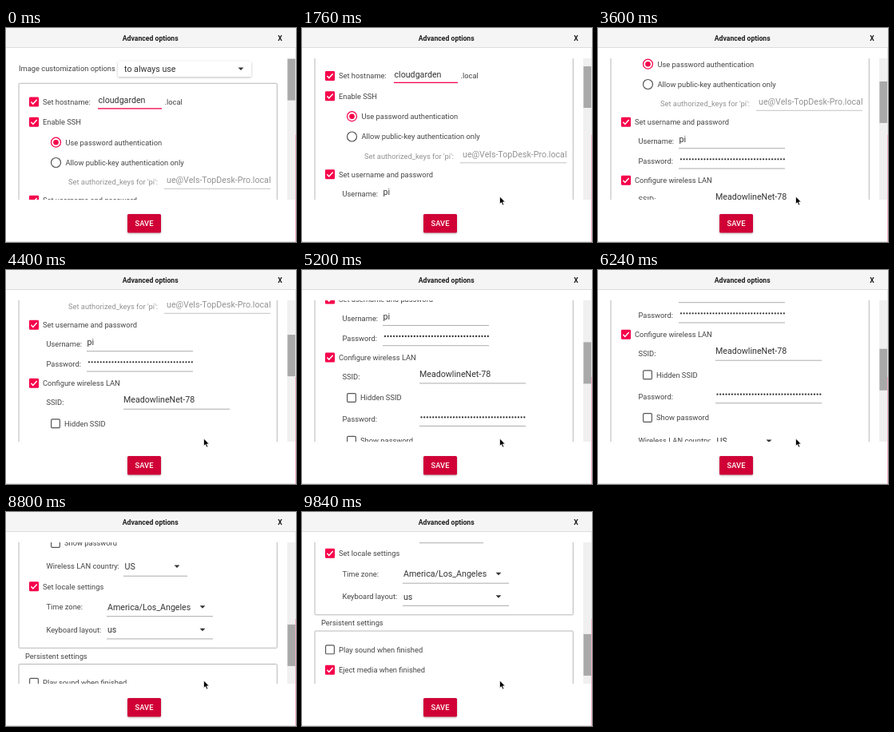
An HTML page with a canvas for the animation above (9920 ms loop, 363 by 268 pixels).

```html
<!DOCTYPE html>
<html lang="en">
<head>
<meta charset="utf-8">
<title>Advanced options</title>
<style>
html, body { margin: 0; width: 100%; height: 100%; overflow: hidden; background: #fff; }
canvas { display: block; }
</style>
</head>
<body>
<canvas id="stage" width="363" height="268"></canvas>
<script>
const ctx = document.getElementById('stage').getContext('2d');
const LOOP = 9920, STEP = 80;
const INK = '#444', DARK = '#333', GREY = '#929292', PINK = '#f5004b', RED = '#d00036';
const TOP = 38, BOTTOM = 215;

// [time, scroll offset]; short rests separate the scroll gestures
const scrollKeys = [
  [0, 0], [1200, 0], [1760, 32.5], [2160, 48], [2240, 48], [3600, 98],
  [4240, 146], [4320, 146], [4400, 147], [4800, 165], [4880, 165],
  [5440, 190], [5600, 190], [6080, 207], [6160, 207], [6240, 208],
  [8800, 354], [9840, 395.5]
];

function scrollAt(t) {
  const i = scrollKeys.findIndex(k => k[0] >= t);
  if (i < 1) return scrollKeys[i < 0 ? scrollKeys.length - 1 : 0][1];
  const [t0, s0] = scrollKeys[i - 1], [t1, s1] = scrollKeys[i];
  return s0 + (s1 - s0) * (t - t0) / (t1 - t0);
}

function rect(x, y, w, h, color) {
  ctx.fillStyle = color;
  ctx.fillRect(x, y, w, h);
}

function text(str, x, y, { size = 9.33, color = INK, weight = 400, align = 'left' } = {}) {
  ctx.font = `${weight} ${size}px Roboto, sans-serif`;
  ctx.fillStyle = color;
  ctx.textAlign = align;
  ctx.fillText(str, x, y);
}

function shape(points, fill, stroke, width = 1) {
  ctx.beginPath();
  points.forEach(([x, y]) => ctx.lineTo(x, y));
  if (fill) {
    ctx.closePath();
    ctx.fillStyle = fill;
    ctx.fill();
  }
  if (stroke) {
    ctx.strokeStyle = stroke;
    ctx.lineWidth = width;
    ctx.stroke();
  }
}

function frame(x, y, w, h, color, width, radius) {
  ctx.beginPath();
  ctx.roundRect(x, y, w, h, radius);
  ctx.strokeStyle = color;
  ctx.lineWidth = width;
  ctx.stroke();
}

function card(x, y, w, h, color) {
  ctx.save();
  ctx.shadowColor = 'rgba(0,0,0,.26)';
  ctx.shadowBlur = 3;
  ctx.shadowOffsetY = 1;
  ctx.beginPath();
  ctx.roundRect(x, y, w, h, 1.5);
  ctx.fillStyle = color;
  ctx.fill();
  ctx.restore();
}

const label = (str, x, y, opts) => text(str, x, y + 3.4, opts);
const value = (str, x, y, color = DARK) => text(str, x, y, { size: 10.67, color });
const line = (x, y, w, color = '#acacac', h = 1) => rect(x, y - h / 2, w, h, color);
const arrow = (x, y) => shape([[x - 3.4, y - 1.7], [x + 3.4, y - 1.7], [x, y + 1.7]], DARK);

function checkbox(str, x, y, on) {
  if (on) {
    ctx.beginPath();
    ctx.roundRect(x, y - 6, 12, 12, 1.3);
    ctx.fillStyle = PINK;
    ctx.fill();
    shape([[x + 2.4, y], [x + 4.8, y + 2.6], [x + 9.7, y - 2.7]], null, '#fff', 1.5);
  } else {
    frame(x + .6, y - 5.4, 10.8, 10.8, '#555', 1.15, 1.3);
  }
  label(str, x + 17, y);
}

function radio(str, y, on) {
  ctx.beginPath();
  ctx.arc(62.5, y, 6, 0, 7);
  ctx.strokeStyle = on ? PINK : '#555';
  ctx.lineWidth = 1.2;
  ctx.stroke();
  if (on) {
    ctx.beginPath();
    ctx.arc(62.5, y, 3.3, 0, 7);
    ctx.fillStyle = PINK;
    ctx.fill();
  }
  label(str, 74.5, y);
}

function secret(x, y) {
  ctx.fillStyle = DARK;
  for (let i = 0; i < 36; i++) {
    ctx.beginPath();
    ctx.arc(x + 2 + i * 3.68, y, 1.15, 0, 7);
    ctx.fill();
  }
}

function clipTo(x, y, w, h) {
  ctx.save();
  ctx.beginPath();
  ctx.rect(x, y, w, h);
  ctx.clip();
}

function form() {
  text('Image customization options', 16, 54.4);
  card(140, 41.5, 167, 19.5, '#fff');
  value('to always use', 148, 54.8);
  arrow(294, 51.3);

  frame(16, 69.3, 323.3, 455, '#b8b8b8', 1, 1);

  checkbox('Set hostname:', 29, 92.5, true);
  value('cloudgarden', 115.5, 94);
  line(115, 100.9, 80, PINK, 1.3);
  label('.local', 198.5, 92.5);

  checkbox('Enable SSH', 29, 117.8, true);
  radio('Use password authentication', 143.2, true);
  radio('Allow public-key authentication only', 168.5, false);
  label("Set authorized_keys for 'pi':", 78, 193, { color: GREY });
  clipTo(197.5, 180, 134.5, 20);
  text('ue@Vels-TopDesk-Pro.local', 331.5, 194, { size: 10.67, color: GREY, align: 'right' });
  ctx.restore();
  line(198, 201.3, 133, '#c4c4c4');

  checkbox('Set username and password', 29, 215.8, true);
  label('Username:', 50.5, 240);
  value('pi', 101.5, 241);
  line(101, 248.7, 133);
  label('Password:', 50.5, 265);
  secret(102, 262.3);
  line(101, 274, 133);

  checkbox('Configure wireless LAN', 29, 288.8, true);
  label('SSID:', 50.5, 313);
  value('MeadowlineNet-78', 147, 313.3);
  line(147, 321.2, 133);
  checkbox('Hidden SSID', 56, 339.3, false);
  label('Password:', 50.5, 366.2);
  secret(147.5, 363.7);
  line(147, 374.7, 133);
  checkbox('Show password', 56, 393, false);
  label('Wireless LAN country:', 50.5, 421.8);
  value('US', 148.5, 426);
  line(147, 434.2, 80);
  arrow(214, 422.3);

  checkbox('Set locale settings', 29, 447.3, true);
  label('Time zone:', 50.5, 472.8);
  value('America/Los_Angeles', 127, 476.6);
  line(126, 484.7, 133);
  arrow(246, 473);
  label('Keyboard layout:', 50.5, 501.3);
  value('us', 127, 505);
  line(126, 512.9, 133);
  arrow(246, 501.5);

  label('Persistent settings', 24, 534.3);
  frame(16, 544.5, 323.3, 90, '#b8b8b8', 1, 1);
  checkbox('Play sound when finished', 29, 567.8, false);
  checkbox('Eject media when finished', 29, 593.2, true);
}

function pointer(t) {
  if (t < STEP) return;
  const p = Math.min(1, (t - STEP) / 960), rest = (1 - p) ** 3;
  ctx.save();
  ctx.translate(247.5 - 12 * rest, 211 + 55 * rest);
  shape([[0, 0], [0, 9.4], [2.1, 7.5], [3.6, 11], [5.2, 10.3], [3.8, 7], [6.7, 6.8]], '#000', '#fff', .7);
  ctx.restore();
}

function draw(t) {
  const s = scrollAt(t);
  rect(0, 0, 363, 268, '#fff');
  rect(0, 0, 363, 24, '#f5f5f5');
  rect(0, 24, 363, 1, '#dcdcdc');
  const bold = { size: 8.67, weight: 700, color: '#1c1c1c', align: 'center' };
  text('Advanced options', 180.7, 15.6, bold);
  text('X', 343, 15.6, bold);

  clipTo(0, TOP, 352, BOTTOM - TOP);
  ctx.translate(0, -s);
  form();
  ctx.restore();

  rect(352, TOP, 10, BOTTOM - TOP, '#f0f0f0');
  rect(352.4, 38.6 + s * .289, 9.6, 52, '#a9a9a9');

  card(152, 233, 42, 23.5, RED);
  text('SAVE', 173, 248.2, { color: '#fff', weight: 500, align: 'center' });
  rect(0, 267, 363, 1, '#e2e2e2');
  rect(362, 25, 1, 109, '#e6e6e6');
  rect(362, 134, 1, 134, '#f3b1c4');
  pointer(t);
}

function tick() {
  const t = performance.now() % LOOP;
  draw(Math.floor(t / STEP) * STEP);
  requestAnimationFrame(tick);
}
tick();
</script>
</body>
</html>
```
